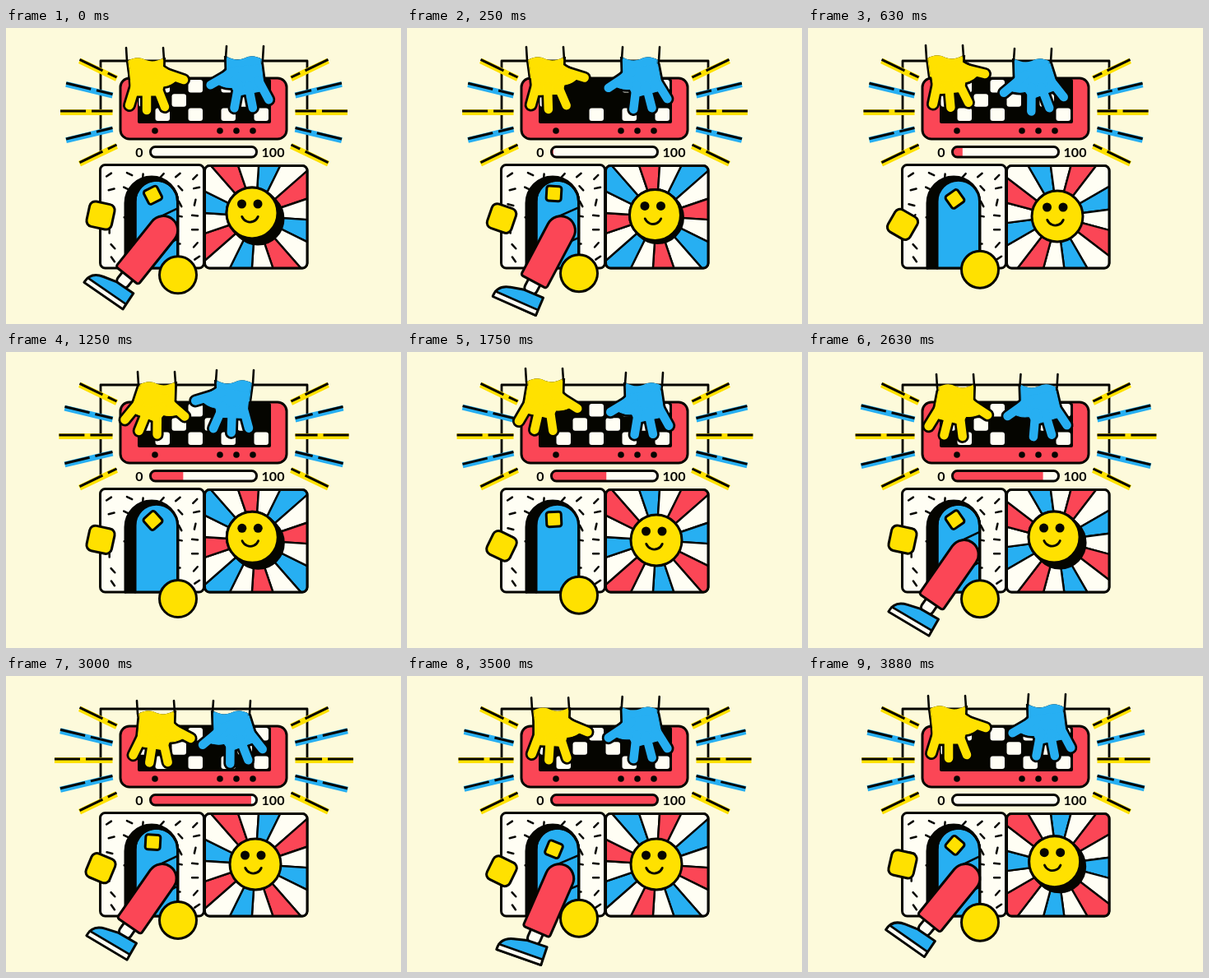
An HTML page with a canvas that plays this animation: 480 by 360 pixels, repeating every 4010 ms.

```html
<!DOCTYPE html>
<html lang="en">
<head>
<meta charset="utf-8">
<title>Tap, kick, shine</title>
<style>
html, body { margin: 0; width: 100%; height: 100%; overflow: hidden; background: #fdfadb; }
canvas { display: block; }
</style>
</head>
<body>
<canvas id="stage" width="480" height="360"></canvas>
<script>
const c = document.getElementById('stage').getContext('2d');
const INK = '#050500', BG = '#fdfadb', WHITE = '#fffef4';
const RED = '#fb4656', BLUE = '#27aff2', YELLOW = '#ffe100';
const RAD = Math.PI / 180, LOOP = 4010, STEPS = 32;

// Wave with a given number of cycles per loop, phase in degrees
const wave = (n, cycles, phase = 0) => Math.cos((n / STEPS * 360 * cycles - phase) * RAD);
const smooth = u => u * u * (3 - 2 * u);
const noise = seed => {
  const v = Math.sin(seed * 12.9898) * 43758.5453;
  return v - Math.floor(v);
};

function paint(fill, width = 3) {
  if (fill) { c.fillStyle = fill; c.fill(); }
  if (width) { c.strokeStyle = INK; c.lineWidth = width; c.stroke(); }
}
function box(x, y, w, h, r, fill, width) {
  c.beginPath();
  c.roundRect(x, y, w, h, r);
  paint(fill, width);
}
function disc(x, y, r, fill, width) {
  c.beginPath();
  c.arc(x, y, r, 0, 7);
  paint(fill, width);
}
function line(x1, y1, x2, y2, width = 3, color = INK) {
  c.beginPath();
  c.moveTo(x1, y1);
  c.lineTo(x2, y2);
  c.strokeStyle = color;
  c.lineWidth = width;
  c.stroke();
}
function at(x, y, deg, draw) {
  c.save();
  c.translate(x, y);
  c.rotate(deg * RAD);
  draw();
  c.restore();
}
function tile(x, y, deg, size, r) {
  at(x, y, deg, () => box(-size / 2, -size / 2, size, size, r, YELLOW));
}

function rays(n) {
  for (const side of [-1, 1]) {
    for (let i = -2; i <= 2; i++) {
      const a = Math.abs(i);
      const near = a === 2 ? 106 : 111;
      const far = [178, 171, 151][a] - (a < 2 ? 5 * wave(n, 1, 45) : 0);
      const y1 = 102.5 + 20.5 * i, y2 = y1 + .24 * i * (far - near);
      const x1 = 240.5 + side * near, x2 = 240.5 + side * far;
      line(x2, y2, x1, y1, 7, a === 1 ? BLUE : YELLOW);
      c.setLineDash([31, 7, 99]);
      line(x2, y2 - 1.5, x1, y1 - 1.5);
      c.setLineDash([]);
    }
  }
}

function keyboard(n) {
  box(139, 61, 202, 74, 11, RED);
  box(160, 62, 162, 54, 2, INK, 0);
  for (let i = 0; i < 24; i++) {
    const col = i % 8, row = i >> 3;
    if ((col + row) % 2 && noise(i + 31 * n) > .2)
      box(161.5 + 20 * col, 63 + 17.3 * row, 17.5, 15.5, 3, WHITE, 0);
  }
  for (const x of [181, 260, 280, 300]) disc(x, 125, 3.8, INK, 0);
}

function progress(n) {
  const part = n < 1 || n > 28 ? 0 : smooth(Math.min(1, (n + .5) / 28.2));
  c.save();
  c.beginPath();
  c.roundRect(175.5, 144.5, 129, 12.5, 6);
  c.clip();
  c.fillStyle = WHITE;
  c.fillRect(175, 144, 131, 14);
  c.fillStyle = RED;
  c.fillRect(175, 144, 129 * part, 14);
  c.restore();
  box(175.5, 144.5, 129, 12.5, 6);
  c.fillStyle = INK;
  c.font = 'bold 16px Lato, sans-serif';
  c.textAlign = 'center';
  c.fillText('0', 162, 157);
  c.fillText('100', 324.5, 157);
}

function arch(l, r, y) {
  c.beginPath();
  c.moveTo(l, 292);
  c.lineTo(l, y);
  c.arc((l + r) / 2, y, (r - l) / 2, Math.PI, 0);
  c.lineTo(r, 292);
}
function doorCard(n) {
  box(114.5, 166.5, 126, 125.5, 6, WHITE);
  for (let i = 0; i < 42; i++) {
    const x = 125 + i % 6 * 20.5 + 5 * noise(i), y = 177 + Math.floor(i / 6) * 17 + 5 * noise(i + 50);
    if (x < 235) at(x, y, 180 * noise(i + 90), () => line(-3.5, 0, 3.5, 0, 2.5));
  }
  arch(145, 209, 213);
  paint(INK);
  arch(157, 208.5, 211);
  paint(BLUE);
  line(145, 292, 210, 292);
  tile(178.5, 206 - 4.8 * wave(n, 3, 55), -35 + 39 * wave(n, 3, 78), 18, 3);
}

function sunCard(n) {
  c.save();
  box(241.5, 167.5, 124.5, 124.5, 6, WHITE);
  c.clip();
  at(303, 229, 360 / STEPS * n - 75, () => {
    for (let i = 0; i < 16; i++) {
      c.beginPath();
      c.moveTo(0, 0);
      c.arc(0, 0, 100, (i - .5) * 22.5 * RAD, (i + .5) * 22.5 * RAD);
      c.closePath();
      paint([BLUE, WHITE, RED, WHITE][i % 4], 2.4);
    }
  });
  c.restore();
  box(241.5, 167.5, 124.5, 124.5, 6);
  const lift = 4 * Math.max(0, wave(n, 3));
  if (lift > .2) for (let d = -lift; d < lift; d++) disc(303 + d, 229 + d, 31, INK);
  at(303 - lift, 229 - lift, 0, () => {
    disc(0, 0, 31, YELLOW);
    disc(-12.5, -11, 5.5, INK, 0);
    disc(7, -11, 5.5, INK, 0);
    c.beginPath();
    c.arc(-2.5, .5, 10.5, .12 * Math.PI, .88 * Math.PI);
    paint(null, 2.8);
  });
}

// Kicks out of the door from step 16 and goes back after the loop point.
function leg(n) {
  if (n > 3 && n < 16) return;
  const m = n < 4 ? n + STEPS : n;
  const deg = 30.3 + 9.2 * Math.cos((m - 31.4) / 8.9 * 2 * Math.PI);
  const x = 192 - .4 * (39 - deg), y = 246;
  c.save();
  arch(157, 208.5, 211);
  c.clip();
  line(x, y, 235, 225, 36);
  line(x, y, 235, 225, 31, BLUE);
  c.restore();
  arch(157, 208.5, 211);
  paint();
  at(x, y, deg, () => {
    box(-7.5, 66, 16, 20, 6, WHITE);
    c.beginPath();
    c.moveTo(19, 83);
    c.lineTo(21, 106);
    c.lineTo(-36, 110);
    c.quadraticCurveTo(-38, 95, -22, 90);
    c.lineTo(-6, 85);
    c.closePath();
    paint(BLUE);
    c.beginPath();
    c.moveTo(20, 99);
    c.lineTo(21, 106);
    c.lineTo(-36, 110);
    c.lineTo(-36, 103);
    c.closePath();
    paint(WHITE, 2.6);
    box(-18, -17, 35, 88, [18, 18, 3, 3], RED);
  });
}

// Fingers and thumb: root x, root y, tip x, tip y
const FINGERS = [[-12, 30, -20, 56], [1, 34, 1, 62], [12, 30, 23, 58], [14, 14, 46, 25]];
function handShape(deg, color, grow) {
  c.fillStyle = c.strokeStyle = color;
  c.lineWidth = 1 + grow;
  c.beginPath();
  c.moveTo(-22, -6);
  c.lineTo(21, -6);
  c.lineTo(20, 24);
  c.lineTo(-18, 24);
  c.closePath();
  c.fill();
  c.stroke();
  at(0, 0, deg, () => {
    c.beginPath();
    c.moveTo(-19, 12);
    c.lineTo(19, 8);
    c.quadraticCurveTo(28, 15, 42, 21);
    c.quadraticCurveTo(32, 32, 21, 33);
    c.lineTo(18, 44);
    c.lineTo(-17, 44);
    c.closePath();
    c.fill();
    c.stroke();
    for (const f of FINGERS) line(...f, 10.5 + grow, color);
  });
}
function hand(x, y, deg, flip, color) {
  c.save();
  c.translate(x, y);
  c.scale(flip, 1);
  c.save();
  c.beginPath();
  c.moveTo(-80, 2);
  c.lineTo(-22, 2);
  c.quadraticCurveTo(-10, -5, 0, 1);
  c.quadraticCurveTo(10, 5, 22, -2);
  c.lineTo(80, -2);
  c.lineTo(80, 100);
  c.lineTo(-80, 100);
  c.clip();
  handShape(deg * flip, INK, 5.5);
  handShape(deg * flip, color, 0);
  c.restore();
  line(-23, 2, -24, -14, 2.6);
  line(22, 0, 21, -14, 2.6);
  c.restore();
}

// Key points: step, wrist x, wrist y, turn
const LEFT = [[0, 170, 38, 0], [5, 167, 35, -5], [10, 184, 38, 22], [14, 168, 34, 13], [18, 177, 38, 20], [24, 183, 44, 9], [31, 170, 38, 0]];
const RIGHT = [[0, 289, 36, -11], [5, 272, 39, -21], [10, 277, 36, 2], [14, 287, 39, -12], [18, 286, 38, -12], [24, 273, 44, -21], [31, 289, 36, -11]];
function pose(keys, n) {
  const i = Math.max(1, keys.findIndex(k => k[0] >= n));
  const a = keys[i - 1], b = keys[i];
  const u = smooth((n - a[0]) / (b[0] - a[0]));
  return a.map((v, j) => v + (b[j] - v) * u).slice(1);
}

function draw(n) {
  c.fillStyle = BG;
  c.fillRect(0, 0, 480, 360);
  c.lineJoin = 'round';
  c.lineCap = 'round';
  c.beginPath();
  c.moveTo(115, 151);
  c.lineTo(115, 40);
  c.lineTo(366, 40);
  c.lineTo(366, 151);
  paint(null, 2.8);
  c.lineCap = 'butt';
  rays(n);
  c.lineCap = 'round';
  keyboard(n);
  progress(n);
  doorCard(n);
  sunCard(n);
  leg(n);
  tile(115, 233.5 + 5.5 * wave(n, 3, 178), 21 + 9 * wave(n, 3, 170), 31, 7);
  disc(209, 297 + 3.3 * wave(n, 3), 22.5, YELLOW);
  hand(...pose(LEFT, n), 1, YELLOW);
  hand(...pose(RIGHT, n), -1, BLUE);
}

// The picture advances eight times a second.
function tick(now) {
  const t = Math.floor(now % LOOP / 10) * 10;
  draw(Math.min(STEPS - 1, Math.floor(t / 125)));
  requestAnimationFrame(tick);
}
draw(0);
requestAnimationFrame(tick);
</script>
</body>
</html>
```
